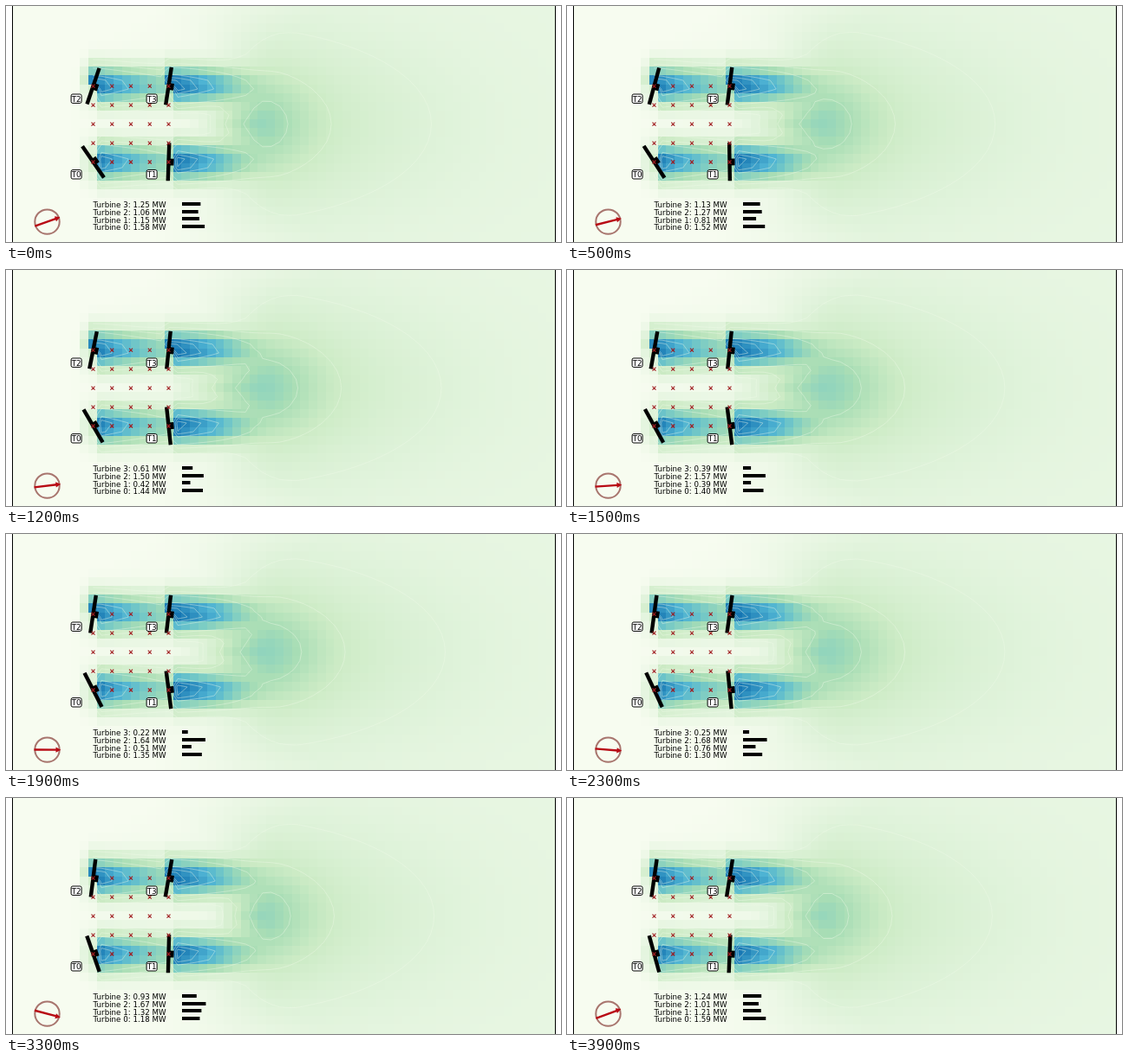
Animation of 640 by 273 pixels, one loop 4 s. Source, as an HTML page with a canvas:

```html
<!DOCTYPE html>
<html lang="en">
<head>
<meta charset="utf-8">
<title>Wind farm wakes</title>
<style>
  html, body { margin: 0; width: 100%; height: 100%; overflow: hidden; background: #fff; }
  canvas { display: block; }
</style>
</head>
<body>
<canvas id="stage" width="640" height="273"></canvas>
<script>
const ctx = document.getElementById('stage').getContext('2d');
const LOOP = 4, STEP = 0.1;
const COLS = 64, ROWS = 27, LEFT = 7.3, CW = 9.78, CH = 273 / ROWS, MID = 136.5;
const TURBINE_X = 100.5, TURBINE_Y = 92.7, SPACING = 87;

const PALETTE = ['f7fcf0', 'e0f3db', 'ccebc5', 'a8ddb5', '7bccc4', '4eb3d3', '2b8cbe', '0868ac', '084081']
  .map(h => [0, 2, 4].map(i => parseInt(h.slice(i, i + 2), 16)));
const LEVELS = [0.14, 0.24, 0.36, 0.6, 0.7, 0.78];

const clamp = v => Math.max(0, Math.min(1, v));
const mix = (a, b, k) => a + (b - a) * k;
const smooth = (a, b, v) => { const k = clamp((v - a) / (b - a)); return k * k * (3 - 2 * k); };
const bell = v => Math.exp(-v * v);
const radians = deg => deg * Math.PI / 180;

// All motion comes from waves of one loop length and slow parabolas.
function stateAt(t) {
  const wave = peak => Math.cos(2 * Math.PI * (t - peak) / LOOP);
  const gust = t > 3.85 ? t - LOOP : t; // the wind swings back just before the loop ends
  return {
    wind: -19.4 + 10.4 * gust,
    yaw: [
      -34.5 + 3 * t + 0.5 * t * t,
      -2.5 + 5 * wave(3.7),
      7 + 1.3 * (t - 3) ** 2,
      7.8 + 2 * wave(3.3)
    ],
    power: [
      1.58 - 0.12 * gust,
      0.86 + 0.47 * wave(3.43),
      1.7 - 0.085 * (gust - 2.75) ** 2,
      0.73 + 0.52 * wave(0.05)
    ],
    sway: wave(1.9),
    tongue: 255 + 28 * wave(3.1)
  };
}

function wakeAt(col, row, x, y, s) {
  const across = bell((y - 44) / 22);
  const start = row < 9 ? 9 : 10;
  if (col < start) return col < 8 ? 0 : 0.2 * across / (start - col);
  const strength = col < start + 9
    ? 0.82 * Math.exp(-Math.max(0, x - 105) / 115)
    : 0.84 * Math.exp(-Math.pow(Math.max(0, x - 192) / (118 + 10 * s.sway), 1.2));
  return strength * across;
}

function fieldAt(col, row, s) {
  const x = LEFT + (col + 0.5) * CW, y = Math.abs((row + 0.5) * CH - MID);
  const base = 0.083 * clamp((x - 60 - 1.6 * Math.max(0, y - 65)) / 200);
  const dx = Math.max(0, x - 285 - 8 * s.sway);
  const plume = 0.16 * bell(dx / 210) * bell(y / 105) + 0.2 * bell(dx / 70) * bell(y / 55);
  const from = mix(s.tongue - 55, 240, clamp(y / 40)) - 1.4 * Math.max(0, y - 65);
  const blend = smooth(from, mix(303, 322, clamp(y / 40)), x);
  return mix(wakeAt(col, row, x, y, s) + base * 0.5, plume + base, blend);
}

function color(v) {
  const p = clamp(v) * 8, i = Math.min(7, Math.floor(p));
  return `rgb(${PALETTE[i].map((c, j) => Math.round(mix(c, PALETTE[i + 1][j], p - i)))})`;
}

function drawField(grid) {
  const px = c => Math.floor(LEFT + c * CW), py = r => Math.floor(r * CH + 0.01);
  grid.forEach((line, r) => line.forEach((v, c) => {
    ctx.fillStyle = color(v);
    ctx.fillRect(px(c), py(r), px(c + 1) - px(c), py(r + 1) - py(r));
  }));
}

function drawContours(grid) {
  const corners = [[0, 0], [1, 0], [1, 1], [0, 1]];
  ctx.strokeStyle = 'rgba(240,250,232,0.45)';
  ctx.lineWidth = 0.9;
  ctx.beginPath();
  for (const level of LEVELS)
    for (let r = 0; r < ROWS - 1; r++)
      for (let c = 9; c < COLS - 1; c++) {
        const hits = [];
        corners.forEach(([ax, ay], i) => {
          const [bx, by] = corners[(i + 1) % 4];
          const a = grid[r + ay][c + ax], b = grid[r + by][c + bx];
          if ((a < level) === (b < level)) return;
          const k = (level - a) / (b - a);
          hits.push([LEFT + (c + 0.5 + mix(ax, bx, k)) * CW, (r + 0.5 + mix(ay, by, k)) * CH]);
        });
        for (let i = 0; i + 1 < hits.length; i += 2) {
          ctx.moveTo(...hits[i]);
          ctx.lineTo(...hits[i + 1]);
        }
      }
  ctx.stroke();
}

// Turbines 0 and 1 stand in the lower row, 2 and 3 in the upper one.
const turbineX = i => TURBINE_X + (i % 2) * SPACING;
const turbineY = i => TURBINE_Y + (i < 2 ? SPACING + 0.6 : 0);

function drawTurbine(yaw, i) {
  ctx.save();
  ctx.translate(turbineX(i), turbineY(i));
  ctx.rotate(radians(yaw));
  ctx.fillStyle = '#000';
  ctx.fillRect(-2.2, -22, 4.4, 44);
  ctx.fillRect(0, -3.7, 6, 7.8);
  ctx.restore();
}

function drawMarkers() {
  ctx.strokeStyle = '#a01c20';
  ctx.lineWidth = 1.1;
  ctx.beginPath();
  for (let i = 0; i < 5; i++)
    for (let j = 0; j < 5; j++) {
      const x = TURBINE_X + i * SPACING / 4, y = TURBINE_Y + j * 21.95;
      ctx.moveTo(x - 2, y - 2); ctx.lineTo(x + 2, y + 2);
      ctx.moveTo(x - 2, y + 2); ctx.lineTo(x + 2, y - 2);
    }
  ctx.stroke();
}

function drawLabel(i) {
  const x = turbineX(i) - 19.4, y = turbineY(i) + 14.5;
  ctx.beginPath();
  ctx.roundRect(x - 6, y - 5.2, 12, 10.4, 1.8);
  ctx.fillStyle = '#fff';
  ctx.fill();
  ctx.strokeStyle = '#000';
  ctx.lineWidth = 1;
  ctx.stroke();
  ctx.fillStyle = '#000';
  ctx.textAlign = 'center';
  ctx.fillText('T' + i, x, y + 3.3);
}

function drawPower(power, i) {
  const y = 255 - i * 8.7;
  ctx.textAlign = 'left';
  ctx.fillStyle = '#000';
  ctx.fillText(`Turbine ${i}: ${power.toFixed(2)} MW`, 100.6, Math.round(y + 4.2));
  ctx.fillRect(203, Math.round(y) - 2, 3.5 + 14.3 * power, 4);
}

function drawWind(angle) {
  ctx.save();
  ctx.translate(47.5, 249.6);
  ctx.strokeStyle = '#a8756e';
  ctx.lineWidth = 2;
  ctx.beginPath();
  ctx.arc(0, 0, 14.2, 0, 2 * Math.PI);
  ctx.stroke();
  ctx.rotate(radians(angle));
  ctx.fillStyle = '#b80a14';
  ctx.fillRect(-15, -1.2, 26, 2.4);
  ctx.beginPath();
  ctx.moveTo(15.8, 0); ctx.lineTo(10, -3.1); ctx.lineTo(10, 3.1);
  ctx.fill();
  ctx.restore();
}

function draw(t) {
  const s = stateAt(t);
  const grid = Array.from({ length: ROWS }, (_, r) =>
    Array.from({ length: COLS }, (_, c) => fieldAt(c, r, s)));
  ctx.fillStyle = '#fff';
  ctx.fillRect(0, 0, 640, 273);
  ctx.font = '8.7px "DejaVu Sans", sans-serif';
  drawField(grid);
  drawContours(grid);
  s.yaw.forEach(drawTurbine);
  drawMarkers();
  s.yaw.forEach((_, i) => drawLabel(i));
  s.power.forEach(drawPower);
  drawWind(s.wind);
  ctx.fillStyle = '#000';
  ctx.fillRect(7, 0, 1, 273);
  ctx.fillRect(633, 0, 1, 273);
}

function tick() {
  const seconds = performance.now() / 1000 % LOOP;
  draw(Math.floor(seconds / STEP) * STEP);
  requestAnimationFrame(tick);
}
tick();
</script>
</body>
</html>
```
